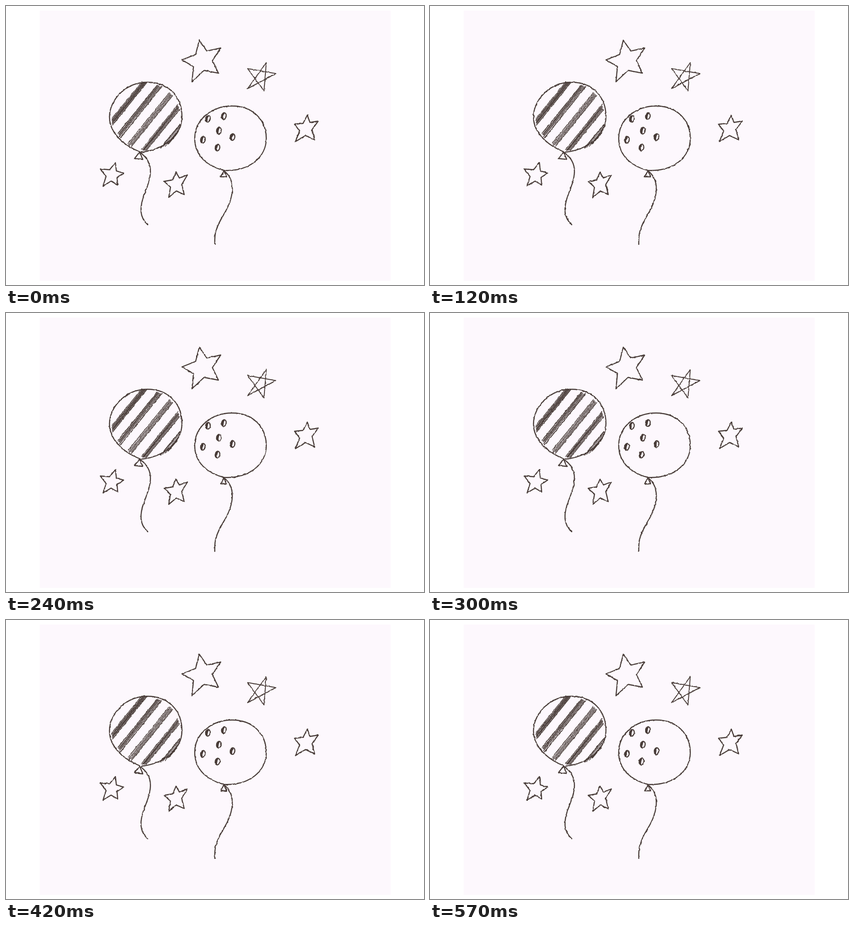
Animation, 917 px wide and 611 px high, one loop 600 ms. Source, as an HTML page:

```html
<!DOCTYPE html>
<html lang="en">
<head>
<meta charset="utf-8">
<title>Balloons and stars</title>
<style>
  html, body { margin: 0; width: 100%; height: 100%; overflow: hidden; background: #fff; }
  svg { display: block; width: 917px; height: 611px; }
</style>
</head>
<body>
<svg viewBox="0 0 917 611">
  <filter id="wobble" filterUnits="userSpaceOnUse" x="0" y="0" width="917" height="611" color-interpolation-filters="sRGB">
    <feTurbulence id="noise" type="fractalNoise" baseFrequency=".15" numOctaves="2" result="n"/>
    <feDisplacementMap in="SourceGraphic" in2="n" scale="3" xChannelSelector="R" yChannelSelector="G"/>
  </filter>
  <rect x="74" y="10" width="770" height="592" fill="#fdf8fd"/>
  <g filter="url(#wobble)" fill="none" stroke="#483c38" stroke-width="2.4" stroke-linecap="round" stroke-linejoin="round">
    <!-- balloons, each with knot and string -->
    <path d="M293 319C262 307 227 280 227 243S262 167 310 167S386 200 386 242S345 315 297 320"/>
    <path d="M293 320l-11 14l18 2ZC330 345 316 380 304 411S293 463 311 479"/>
    <path d="M478 360C445 352 414 330 414 290S450 219 496 219S571 250 571 290S535 363 478 360"/>
    <path d="M478 361l-7 13h13ZC505 381 500 420 478 456S458 505 458 522"/>
    <g id="details"></g>
  </g>
</svg>
<script>
  const get = id => document.getElementById(id);
  const line = (points, width = 2.4) => `<path d="M${points.join('L')}" stroke-width="${width}"/>`;

  let seed = 7;
  const random = () => (seed = seed * 16807 % 2147483647) / 2147483647;

  // Five bands of hatching, each line a chord of the round balloon
  function stripes() {
    const angle = 39 * Math.PI / 180, c = Math.cos(angle), s = Math.sin(angle);
    const at = (across, along) => [306 + across * c - along * s, 243 + across * s + along * c];
    let out = '';
    for (let band = 0; band < 5; band++) {
      for (let k = 0; k < 5; k++) {
        const across = -50 + band * 31 + (k - 2) * 2.4;
        const half = Math.sqrt(78 ** 2 - across ** 2);
        const up = -half * (.99 - random() * .05), down = half * (.93 - random() * .06);
        out += line([at(across, up), at(across + random() - .5, down)], 1.2 + random() * 1.5);
      }
    }
    return out;
  }

  // Oval with its left side shaded
  const dot = (x, y) => `<g transform="translate(${x} ${y}) rotate(12)"><ellipse rx="5" ry="7.3"/>
    <path d="M0 -7Q-10 0 0 7Q-2 0 0 -7" fill="#483c38" stroke-width="1.2"/></g>`;

  // Outline through five tips, with notches pulled from the sides towards the centre
  function star(...tips) {
    const mean = points => [0, 1].map(j => points.reduce((sum, p) => sum + p[j], 0) / points.length);
    const centre = mean(tips);
    const points = tips.flatMap((tip, i) => {
      const side = mean([tip, tips[(i + 1) % 5]]);
      return [tip, side.map((v, j) => v + (centre[j] - v) * .42)];
    });
    return line([...points, tips[0]]);
  }

  get('details').innerHTML = [
    stripes(),
    dot(443, 247), dot(478, 241), dot(467, 273), dot(497, 287), dot(432, 293), dot(464, 310),
    star([424, 75], [471, 92], [466, 147], [408, 166], [386, 118]),
    star([661, 239], [685, 252], [677, 293], [635, 297], [633, 259]),
    star([240, 343], [258, 366], [245, 392], [213, 394], [207, 357]),
    star([373, 364], [398, 370], [391, 413], [357, 419], [347, 384]),
    line([[530, 181], [571, 124], [566, 186], [530, 137], [592, 148], [530, 181]], 2)
  ].join('');

  // The pen line shivers anew every 30 ms, twenty poses to a loop
  function draw(now) {
    get('noise').setAttribute('seed', Math.floor(now / 30) % 20 + 1);
    requestAnimationFrame(draw);
  }
  draw(performance.now());
</script>
</body>
</html>
```
